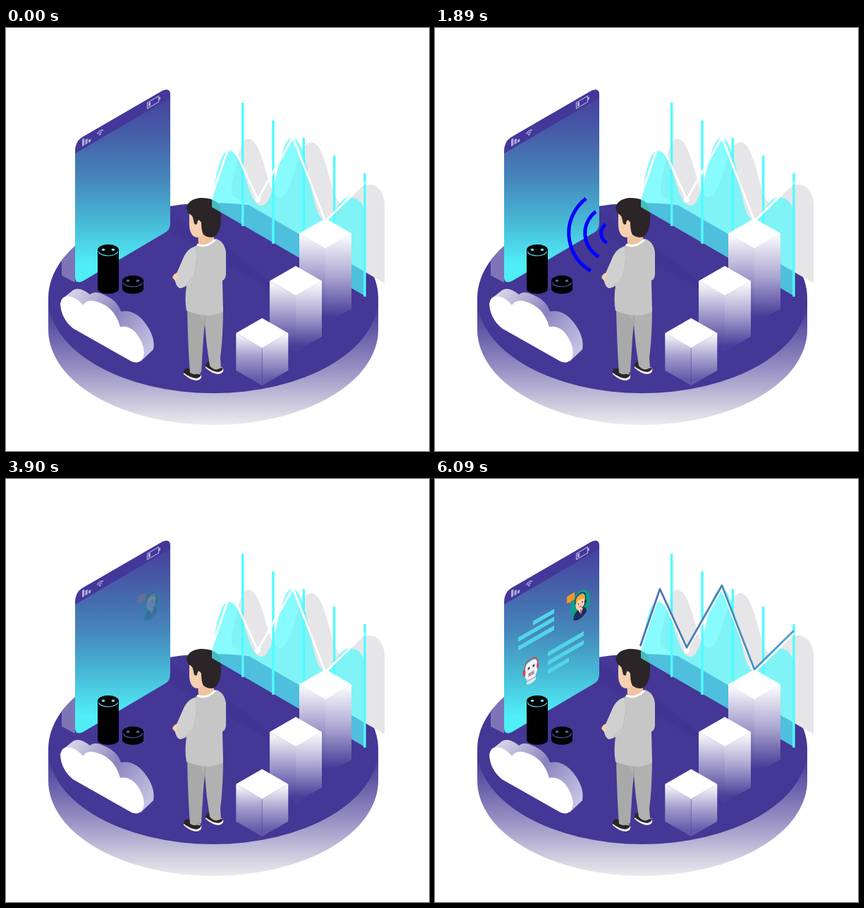
An HTML page with a canvas for the animation above (6.54 s loop, 600 by 600 pixels).

```html
<!DOCTYPE html>
<html lang="en">
<head>
<meta charset="utf-8">
<title>Isometric assistant scene</title>
<style>
html, body { margin: 0; width: 100%; height: 100%; overflow: hidden; background: #fff; }
canvas { display: block; width: 600px; height: 600px; }
</style>
</head>
<body>
<canvas id="stage" width="600" height="600"></canvas>
<script>
const LOOP = 6540, STEP = 30, SLOPE = 0.577;
const stage = document.getElementById('stage');
let g = stage.getContext('2d');

const PURPLE = '#443796', SKIN = '#f6d0b0', DARK = '#2b2527', LILAC = '#b4aedb';
const clamp = v => Math.max(0, Math.min(1, v));

function fill(d, color) {
  g.fillStyle = color;
  g.fill(new Path2D(d));
}

function line(d, color, width) {
  g.strokeStyle = color;
  g.lineWidth = width;
  g.stroke(new Path2D(d));
}

function oval(x, y, rx, ry, color) {
  g.beginPath();
  g.ellipse(x, y, rx, ry, 0, 0, Math.PI * 2);
  g.fillStyle = color;
  g.fill();
}

// Gradient between two points, colours spread evenly.
function blend(x0, y0, x1, y1, ...colors) {
  const b = g.createLinearGradient(x0, y0, x1, y1);
  colors.forEach((c, i) => b.addColorStop(i / (colors.length - 1), c));
  return b;
}

// Draw on the plane of the phone screen, with the origin at x, y.
function onScreen(x, y, draw) {
  g.save();
  g.transform(1, -SLOPE, 0, 1, x, y);
  draw();
  g.restore();
}

function platform() {
  fill('M60 383V428A234 135 0 0 0 528 428V383Z',
    blend(0, 395, 0, 563, PURPLE, '#938bc1', '#ebebed'));
  oval(294, 383, 234, 135, PURPLE);
  fill('M233 290L314 336L420 396L300 300L233 262Z', 'rgba(50,35,125,.12)');
}

function backChart() {
  fill('M320 237V220C328 190 332 157 343 157C366 157 370 240 388 240' +
    'C408 240 412 162 433 162C456 162 460 250 478 250C490 250 496 222 515 222' +
    'C530 222 537 238 537 250V362Z', '#e6e6e8');
}

function phone() {
  fill('M79 329L98 309V361L79 351Z', '#7d75b6');
  const body = 'M98 176Q98 161 108 155L222 89Q233 84 233 95V276Q233 286 226 290' +
    'L109 359Q98 364 98 353Z';
  fill(body, blend(0, 95, 0, 335, '#463f9b', '#4661a9', '#4587bb', '#47b9d6', '#50eef6'));
  g.save();
  g.clip(new Path2D(body));
  fill('M98 80H233V99L98 178Z', '#43379a');
  g.restore();

  onScreen(108, 167, () => {
    g.fillStyle = LILAC;
    [[0, 10], [4.5, 7], [9, 4]].forEach(([x, h]) => g.fillRect(x, 1 - h, 3.2, h));
  });
  onScreen(133.5, 151, () => {
    oval(0, 0, 1.3, 1.3, LILAC);
    [3.2, 5.8].forEach(r => {
      g.beginPath();
      g.arc(0, 0.5, r, Math.PI * 1.22, Math.PI * 1.78);
      g.strokeStyle = LILAC;
      g.lineWidth = 1.3;
      g.stroke();
    });
  });
  onScreen(200, 106, () => {
    g.strokeStyle = LILAC;
    g.lineWidth = 1.2;
    g.strokeRect(0.5, 0, 16, 8.5);
    g.fillStyle = LILAC;
    g.fillRect(2, 1.5, 3, 5.5);
    g.fillRect(17, 2.5, 2, 3.5);
  });
}

function speaker(x, top, eye) {
  g.fillStyle = '#000';
  g.fillRect(x - 15, top, 30, 370 - top);
  oval(x, 370, 15, 7, '#000');
  oval(x, top, 15, 7.5, '#000');
  g.beginPath();
  g.ellipse(x, top + 1, 14, 7.5, 0, 0.2, Math.PI - 0.2);
  g.strokeStyle = eye;
  g.lineWidth = 1.1;
  g.stroke();
  oval(x - 7, top, 2.3, 1.7, eye);
  oval(x + 7, top, 2.3, 1.7, eye);
}

function cloud() {
  fill('M80 384L95 372Q104 366 119 378Q126 372 138 378Q158 386 163 402' +
    'Q184 398 200 422Q212 440 209 456L191 473L150 430Z',
    blend(90, 372, 200, 462, '#dcdaea', '#b4afd4', '#8a82bd', '#aaa4d2', '#c6c2e2'));
  fill('M77 391Q79 378 91 381Q101 383 109 393Q115 384 128 388Q154 395 162 424' +
    'Q178 421 189 439Q198 454 195 466Q190 478 178 473L95 426Q78 412 77 391Z', '#fff');
}

function shoe(x, y) {
  g.save();
  g.translate(x, y);
  fill('M0 4Q2 0 8 4L25 9Q27 16 19 18Q10 18 0 9Z', '#f2f2f2');
  fill('M0 4Q2 -1 8 1L14 6Q20 10 25 9Q25 13 18 15Q9 14 0 7Z', DARK);
  g.restore();
}

function man() {
  shoe(252, 482);
  shoe(283, 473);
  fill('M257 396L284 398L280 440L277 488Q269 494 261 489Q258 450 257 396Z', '#a9a9a9');
  fill('M270 398L308 396Q308 436 304 468L305 482Q296 488 289 479Q284 450 282 420Z', '#b1b1b1');
  line('M282 404L282 424', '#9b9b9b', 1);
  fill('M268 310Q276 303 284 306L298 299Q310 303 312 318V350Q311 357 307 358' +
    'L308 402Q288 414 256 401Q253 385 256 366L246 369Q239 364 240 352' +
    'L250 330Q256 313 268 310Z', '#c6c6c6');
  fill('M268 310Q256 314 250 330L240 354Q240 369 249 369L262 361L271 342Z', '#d0d0d0');
  line('M271 328L267 352L252 368', '#b8b8b8', 1);
  fill('M236 354Q238 347 245 347L241 360Z', SKIN);
  fill('M272 288L295 288V302Q285 312 273 306Z', '#efc3a0');
  line('M271 307Q284 313 297 300', '#fff', 3);
  fill('M260 262V280Q261 295 270 297Q278 297 284 288V262Z', SKIN);
  fill('M256 256Q258 243 275 241Q290 240 299 247Q306 255 305 272Q305 288 296 296' +
    'Q288 299 280 293Q277 288 277 276Q272 268 271 278Q267 281 266 273Q265 265 259 263Z', DARK);
}

function frontChart() {
  fill('M292 254V246C296 222 302 174 316 174C338 174 342 252 362 252' +
    'C384 252 386 156 406 156C430 156 432 272 452 272C466 272 470 240 487 240' +
    'C502 240 509 252 509 268V380Z', 'rgba(85,250,252,.7)');
  g.fillStyle = '#50fbff';
  for (let i = 0; i < 5; i++) g.fillRect(334 + i * 43.3, 106 + i * 25, 3.4, 175);
}

const TREND = [[291.5, 236], [319, 156], [357, 239], [407, 151], [453, 270], [508, 216]];

// Trend line cut off at the share p of its length.
function trend(p, color, width, dy) {
  const lengths = TREND.slice(1).map(([x, y], i) => Math.hypot(x - TREND[i][0], y - TREND[i][1]));
  let left = p * lengths.reduce((a, b) => a + b);
  g.beginPath();
  g.moveTo(TREND[0][0], TREND[0][1] + dy);
  for (let i = 0; i < lengths.length && left > 0; i++) {
    const [ax, ay] = TREND[i], [bx, by] = TREND[i + 1];
    const k = Math.min(1, left / lengths[i]);
    g.lineTo(ax + (bx - ax) * k, ay + (by - ay) * k + dy);
    left -= lengths[i];
  }
  g.lineJoin = g.lineCap = 'round';
  g.strokeStyle = color;
  g.lineWidth = width;
  g.stroke();
  g.lineCap = 'butt';
}

function prism(x, top, height, foot) {
  const w = 37, h = 21.3, y = top + h, end = y + height;
  fill(`M${x - w} ${y}L${x} ${y + h}V${end + h}L${x - w} ${end}Z`,
    blend(0, y, 0, end + h * 0.6, '#fff', '#a49dcd', foot));
  fill(`M${x + w} ${y}L${x} ${y + h}V${end + h}L${x + w} ${end}Z`,
    blend(0, y, 0, end + h * 0.6, '#fff', '#aea8d2', foot));
  fill(`M${x} ${top}L${x + w} ${y}L${x} ${y + h}L${x - w} ${y}Z`, '#fff');
}

function drawScene() {
  g.fillStyle = '#fff';
  g.fillRect(0, 0, 600, 600);
  platform();
  backChart();
  phone();
  cloud();
  speaker(145, 314.5, '#63dcf2');
  speaker(180, 358.5, '#4b5fae');
  man();
  frontChart();
  trend(1, '#fff', 3, 4);
  oval(357, 243, 4, 4.5, '#fff');
  prism(453, 270, 107, PURPLE);
  prism(411, 337.5, 79, '#493d99');
  prism(363.3, 411.5, 53, '#6459a8');
  line('M363.3 455V506', 'rgba(80,68,155,.5)', 0.8);
}

function waves(t) {
  if (t < 60 || t >= 2850) return;
  for (let start = 0; start <= t; start += 720) {
    const age = t - start;
    if (age >= 1980) continue;
    g.beginPath();
    g.arc(251.5, 291, 1.5 + age * 0.0318, Math.PI - 1.05, Math.PI + 0.92);
    g.strokeStyle = '#00f';
    g.lineWidth = Math.min(5, 2 + age * 0.015);
    g.stroke();
  }
}

function agent() {
  onScreen(206, 178, () => {
    oval(0, 0, 14, 19.5, '#0f9f8a');
    fill('M-19 -22H-8V-12H-13L-15 -9V-12H-19Z', '#f5971f');
    fill('M-10 16Q-9 7 -3 6H4Q9 8 9 15Q3 21 -3 20Q-8 19 -10 16Z', '#1e2c5c');
    fill('M-3 6H4L1 14Z', '#fff');
    fill('M0 7H2L1.5 13L0 12Z', '#e0433e');
    oval(0, -2, 6.5, 9, '#f8d2b2');
    fill('M-7 -3Q-8 -14 0 -14Q8 -13 7 -3Q4 -8 -3 -7Z', '#f2a93b');
    line('M-7 -4Q-8 -16 0 -16Q9 -15 7.5 -3V2Q6 6 2 6', '#26345f', 1.3);
    oval(7.5, 0, 1.6, 3, '#26345f');
    oval(-2.5, -2, 0.8, 1, '#333');
    oval(3, -2, 0.8, 1, '#333');
    line('M-1.5 3H2', '#e0433e', 1.3);
  });
}

function robot() {
  onScreen(136, 269, () => {
    fill('M-6 12H7V19Q0 23 -6 19Z', '#e3e6ea');
    line('M-6 15H7', '#8d99a8', 1);
    fill('M-8 -4Q-8 -11 0 -11Q9 -11 9 -4V7Q8 14 0 14Q-8 13 -8 7Z', '#f4f5f7');
    line('M-9 -1Q-10 -14 0 -14Q10 -14 10 -1', '#d9474b', 1.3);
    oval(-9.5, 1, 2, 5, '#d9474b');
    oval(9.5, 1, 1.3, 4, '#d9474b');
    oval(-3, -2, 2.4, 2.6, '#c3cad2');
    oval(4, -2, 2.4, 2.6, '#c3cad2');
    oval(-3, -2, 1.2, 1.4, '#333');
    oval(4, -2, 1.2, 1.4, '#333');
    fill('M-4 5H5V10H-4Z', '#a9b0ba');
    line('M-1.5 5V10M2 5V10', '#d9474b', 0.9);
  });
}

// One chat line, with its top edge at y on the left end.
function chatLine(x, y, width) {
  onScreen(x, y, () => {
    g.fillStyle = '#52d5e8';
    g.fillRect(0, 0, width, 6.3);
  });
}

function faded(alpha, draw) {
  if (alpha <= 0) return;
  g.globalAlpha = clamp(alpha);
  draw();
  g.globalAlpha = 1;
}

const scene = document.createElement('canvas');
scene.width = scene.height = 600;
const view = g;
g = scene.getContext('2d');
drawScene();
g = view;

function render(now) {
  const t = Math.floor((now % LOOP) / STEP) * STEP;
  g.drawImage(scene, 0, 0);
  waves(t);
  faded((t - 3840) / 360, agent);
  if (t >= 4410) {
    chatLine(139, 201.5, 30);
    chatLine(118, 224.7, 51);
    chatLine(118, 237.3, 51);
  }
  faded((t - 4650) / 300, robot);
  if (t >= 5100) {
    chatLine(160, 245.5, 51);
    chatLine(160, 258, 51);
    chatLine(160, 270.5, 30);
  }
  if (t >= 5550) {
    trend(clamp((t - 5520) / 570), blend(291, 0, 508, 0, '#4b70b0', '#4a84bb', '#4ba3cc'), 2.8, 0);
  }
  requestAnimationFrame(tick);
}

let begin;
function tick(now) {
  begin ??= now;
  render(now - begin);
}
requestAnimationFrame(tick);
</script>
</body>
</html>
```
